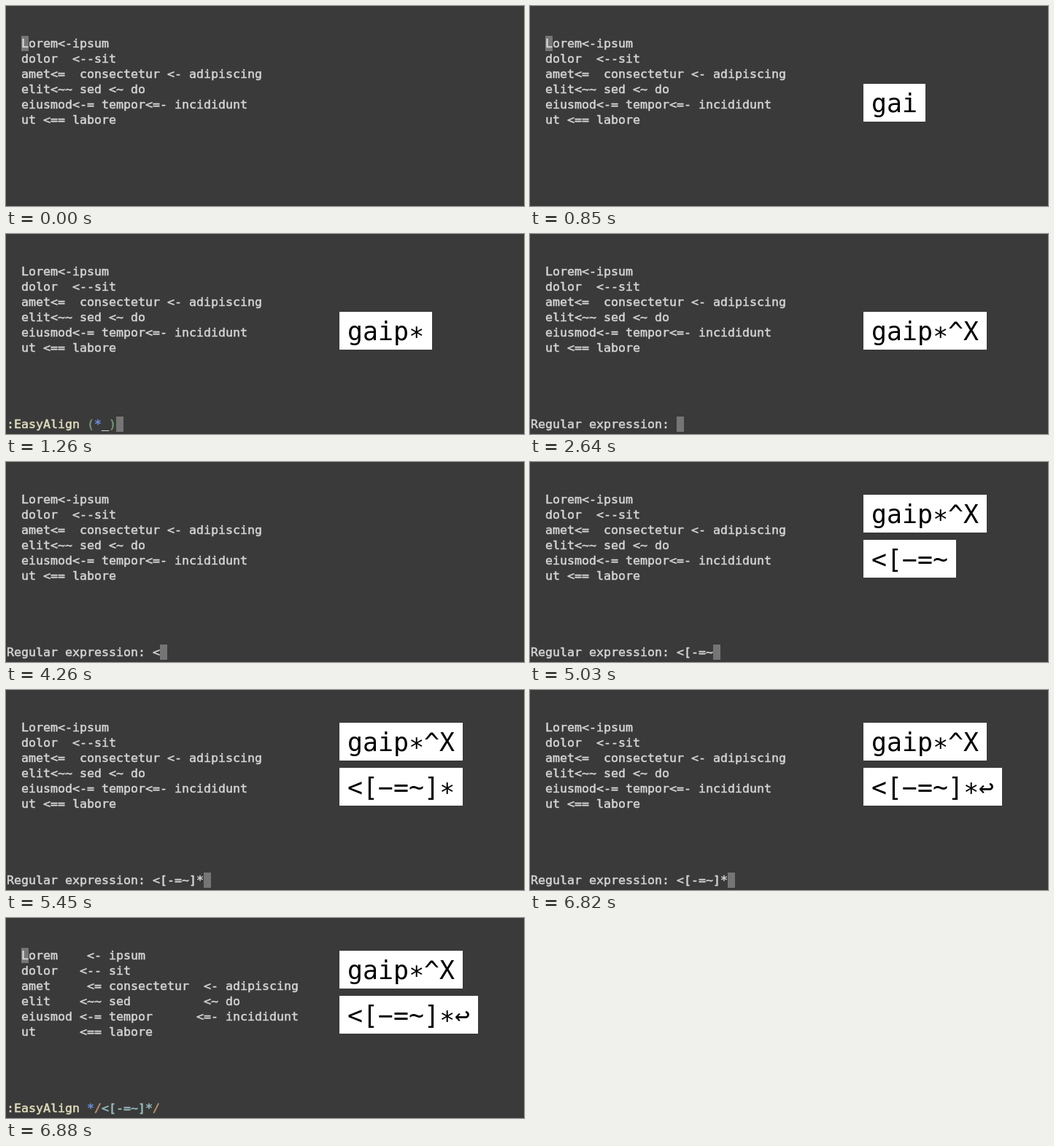
An HTML page for the animation above (8 s loop, 710 by 275 pixels).

```html
<!DOCTYPE html>
<html lang="en">
<head>
<meta charset="utf-8">
<title>Aligning text by regular expression</title>
<style>
  html, body { margin: 0; width: 100%; height: 100%; overflow: hidden; background: #3a3a3a; }
  #stage { position: relative; width: 710px; height: 275px; overflow: hidden; }
  #stage > * { position: absolute; margin: 0; white-space: pre; }
  #buffer, #prompt {
    font: 16.61px/21px "DejaVu Sans Mono", monospace;
    color: #d4d4d4;
    -webkit-text-stroke: 0.5px currentColor;
  }
  #buffer { left: 21px; top: 41px; }
  #prompt { left: 1px; top: 251px; }
  #cursor { width: 10px; height: 21px; background: #757575; }
  .keys {
    left: 457px; height: 52px; box-sizing: border-box; padding-left: 11px; overflow: hidden;
    font: 34.88px/54px "DejaVu Sans Mono", monospace;
    color: #000; background: #fff;
  }
  #upper { top: 45px; }
  #lower { top: 107px; }
  #prompt span { -webkit-text-stroke-color: currentColor; }
  .command { color: #dfdebd; }
  .paren { color: #719872; }
  .star { color: #6a8fdc; }
  .slash { color: #be8f6c; }
  .pattern { color: #98bcbd; }
</style>
</head>
<body>
<div id="stage">
  <div id="cursor"></div>
  <pre id="buffer"></pre>
  <div id="prompt"></div>
  <div id="upper" class="keys"></div>
  <div id="lower" class="keys"></div>
</div>
<script>
const LOOP = 8000, CELL = 10, KEY = 21;
const $ = id => document.getElementById(id);

const ragged = `Lorem<-ipsum
dolor  <--sit
amet<=  consectetur <- adipiscing
elit<~~ sed <~ do
eiusmod<-= tempor<=- incididunt
ut <== labore`;

const aligned = `Lorem    <- ipsum
dolor   <-- sit
amet     <= consectetur  <- adipiscing
elit    <~~ sed          <~ do
eiusmod <-= tempor      <=- incididunt
ut      <== labore`;

const command = [":EasyAlign ", "command"];
const ask = star => [command, ["(", "paren"], [star, "star"], ["_"], [")", "paren"]];
const regex = typed => [["Regular expression: " + typed]];
const done = [command, ["*", "star"], ["/", "slash"], ["<[-=~]*", "pattern"], ["/", "slash"]];

// Each step keeps whatever it does not set.
const steps = [
  { at: 0, text: ragged, prompt: [], editing: false, upper: "", lower: "" },
  { at: 500, lower: "g" },
  { at: 610, lower: "ga" },
  { at: 850, lower: "gai" },
  { at: 1030, lower: "gaip" },
  { at: 1090, prompt: ask(""), editing: true },
  { at: 1260, prompt: ask("*"), lower: "gaip*" },
  { at: 2640, prompt: regex(""), lower: "gaip*^X" },
  { at: 4260, prompt: regex("<"), lower: "" },
  { at: 4320, upper: "gaip*^X", lower: "<" },
  ...[4440, 4680, 4860, 5030, 5270, 5450].map((at, i) => {
    const typed = "<[-=~]*".slice(0, i + 2);
    return { at, prompt: regex(typed), lower: typed };
  }),
  { at: 6820, lower: "<[-=~]*↩" },
  { at: 6880, text: aligned, prompt: done, editing: false }
];
const states = [];
for (const step of steps) states.push({ ...states[states.length - 1], ...step });

function showKeys(id, keys) {
  const box = $(id);
  box.hidden = !keys;
  box.style.width = 22 + KEY * keys.length + "px";
  box.textContent = keys.replace(/\*/g, "∗").replace(/-/g, "−");
}

function showPrompt(parts) {
  $("prompt").replaceChildren(...parts.map(([text, kind = ""]) => {
    const span = document.createElement("span");
    span.className = kind;
    span.textContent = text;
    return span;
  }));
}

function render({ text, prompt, editing, upper, lower }) {
  $("buffer").textContent = text;
  showPrompt(prompt);
  showKeys("upper", upper);
  showKeys("lower", lower);
  const column = prompt.reduce((sum, [part]) => sum + part.length, 0);
  $("cursor").style.left = (editing ? 1 + CELL * column : 21) + "px";
  $("cursor").style.top = (editing ? 251 : 41) + "px";
}

let shown, start;
function tick(now) {
  start ??= now;
  const time = (now - start) % LOOP;
  const state = states.findLast(s => s.at <= time) || states[0];
  if (state !== shown) render(shown = state);
  requestAnimationFrame(tick);
}
render(shown = states[0]);
requestAnimationFrame(tick);
</script>
</body>
</html>
```
